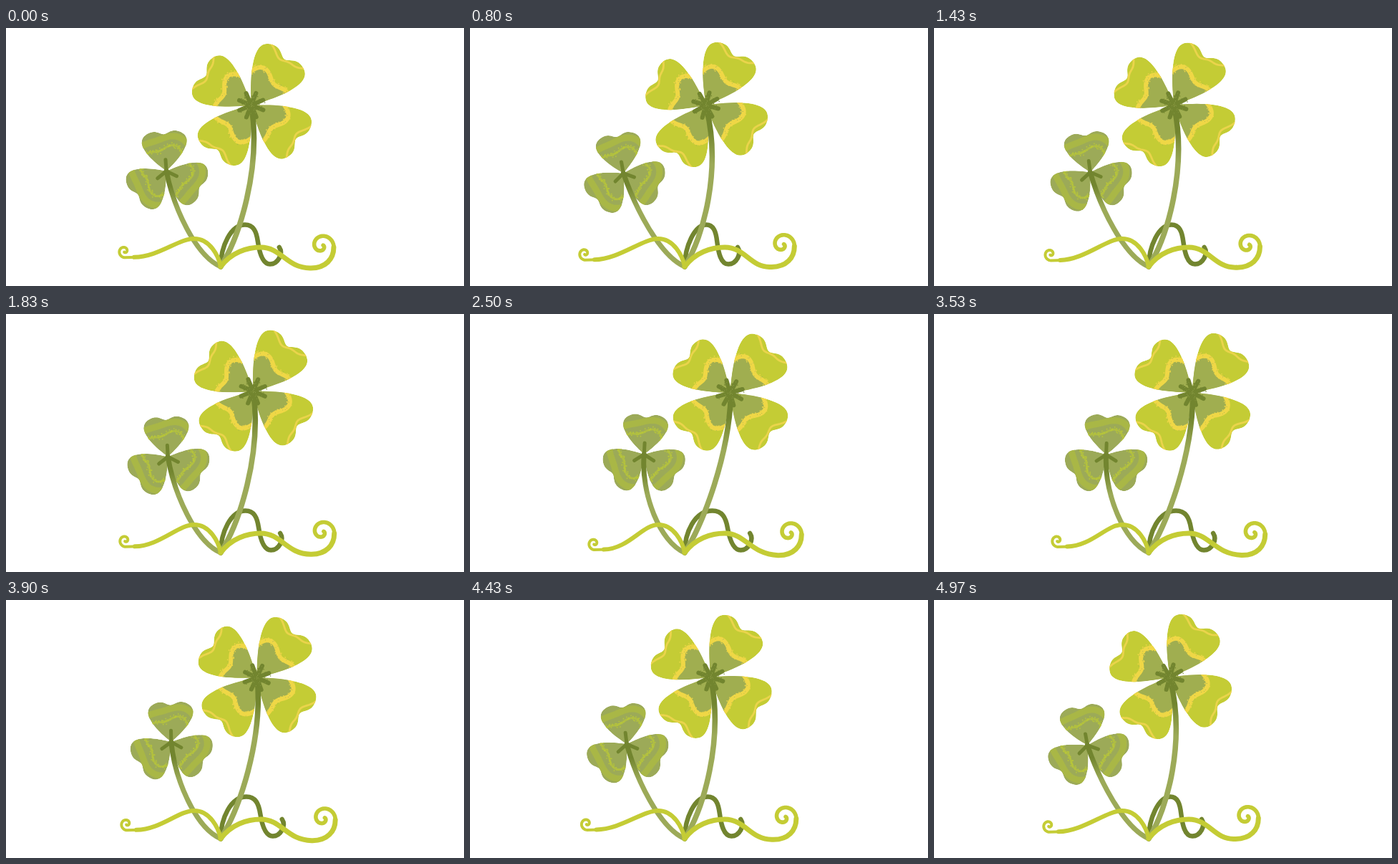
Animation of 640 by 360 pixels, one loop 5100 ms. Source, as an HTML page:

```html
<!DOCTYPE html>
<html lang="en">
<head>
<meta charset="utf-8">
<title>Swaying clover</title>
<style>
  html, body { margin: 0; width: 100%; height: 100%; overflow: hidden; background: #fff; }
  svg { display: block; width: 100%; height: 100%; }
</style>
</head>
<body>
<svg id="stage" viewBox="0 0 640 360" fill="none" stroke-linecap="round" stroke-linejoin="round">
  <defs>
    <linearGradient id="tallFade" gradientUnits="userSpaceOnUse" x1="0" y1="145" x2="0" y2="190">
      <stop offset="0" stop-color="#72852f"/><stop offset="1" stop-color="#9caa58"/>
    </linearGradient>
    <linearGradient id="shortFade" gradientUnits="userSpaceOnUse" x1="0" y1="220" x2="0" y2="252">
      <stop offset="0" stop-color="#72852f"/><stop offset="1" stop-color="#9caa58"/>
    </linearGradient>
  </defs>
</svg>
<script>
const stage = document.getElementById('stage');
const LIME = '#c4cc35', OLIVE = '#9caa58', DARK = '#72852f', YELLOW = '#efd746';
const LOOP = 5100, SWAY = 4170, LEFTMOST = 870, RAD = Math.PI / 180;

let seed = 7;
const rand = () => (seed = (seed * 16807) % 2147483647) / 2147483647;

function add(parent, tag, attrs) {
  const el = document.createElementNS('http://www.w3.org/2000/svg', tag);
  for (const k in attrs) el.setAttribute(k, attrs[k]);
  return parent.appendChild(el);
}
const line = (parent, d, stroke, width) => add(parent, 'path', { d, stroke, 'stroke-width': width });
const group = () => add(stage, 'g', {});

// Point at distance r, with the angle in degrees clockwise from straight up.
const polar = (r, deg) => [r * Math.sin(deg * RAD), -r * Math.cos(deg * RAD)].map(v => v.toFixed(2));

// Curve through fn(u) for u from -1 to 1.
function curve(fn, n = 40) {
  return 'M' + Array.from({ length: n + 1 }, (_, i) => fn(2 * i / n - 1)).join('L');
}

// Chalky specks scattered along a path.
function specks(parent, path, color, spread, size, step) {
  let d = '';
  for (let s = 0; s < path.getTotalLength(); s += step) {
    const p = path.getPointAtLength(s), angle = rand() * 360, r = spread * Math.sqrt(rand());
    const [dx, dy] = polar(r, angle).map(Number);
    d += `M${(p.x + dx).toFixed(1)} ${(p.y + dy).toFixed(1)}h.01`;
  }
  line(parent, d, color, size);
}

// Heart shape: a fan of the given half angle with a rounded end and a notch.
function heart(len, axis, half) {
  return curve(u => {
    const x = Math.sin(u * Math.PI / 2);
    const r = 1.01 * (1 - Math.abs(x) ** 7) - .12 * Math.exp(-25 * x * x);
    return polar(len * r, axis + half * x);
  }, 80) + 'Z';
}

// Wavy band across a leaf.
const band = (len, axis, half, at, depth, flip) => curve(u =>
  polar(len * (at + depth * Math.cos((flip * u * 42 + 18) * 6.2 * RAD)), axis + half * 1.1 * u));

let clips = 0;
function leaf(parent, d, fill) {
  const id = 'leaf' + clips++;
  add(add(parent, 'clipPath', { id }), 'path', { d });
  const g = add(parent, 'g', { 'clip-path': `url(#${id})` });
  add(g, 'path', { d, fill });
  return g;
}

function petal(parent, len, axis, flip) {
  const half = 39, g = leaf(parent, heart(len, axis, half), LIME);
  const d = band(len, axis, half, .55, .065, flip);
  add(g, 'path', { d: d + 'L0,0Z', fill: '#a0ae50' });
  const wave = line(g, d, YELLOW, 6);
  specks(g, wave, YELLOW, 5, 1.7, 1.2);
  specks(g, wave, OLIVE, 4.5, 1, 5);
  line(g, curve(u => polar(len * (.86 + .17 * u * u + .02 * Math.sin(6 * u)), axis + 20 * u)), '#ead44b', 2.8);
}

function leaflet(parent, len, axis, flip) {
  const half = 51, g = leaf(parent, heart(len, axis, half), OLIVE);
  line(g, band(len, axis, half, .82, .05, flip), '#a9b746', 9);
  const wave = line(g, band(len, axis, half, .58, .07, flip), '#afbd43', 3);
  specks(g, wave, '#b9c836', 4, 1.7, 1.3);
}

const rays = (parent, angles, r, width) =>
  line(parent, angles.map(a => `M0,0L${polar(r, a)}`).join(''), DARK, width);

const hook = line(stage, '', DARK, 6.5);
const big = group(), small = group();
const shortStem = line(stage, '', 'url(#shortFade)', 7);
const tallStem = line(stage, '', 'url(#tallFade)', 7.6);
const leftVine = line(stage, '', LIME, 6);
const leftCurl = line(stage, '', LIME, 4);
const rightVine = line(stage, '', LIME, 7);
const rightCurl = line(stage, '', LIME, 5.6);
const bigHeart = group(), smallHeart = group();

petal(big, 89, 36, 1);
petal(big, 85, -57, -1);
petal(big, 88, -143, 1);
petal(big, 88, 127, 1);
const burst = rays(bigHeart, Array.from({ length: 8 }, (_, i) => 22 + 45 * i), 18, 6);
specks(bigHeart, burst, DARK, 5, 1.5, 1.5);
specks(bigHeart, burst, '#93a24c', 5, 1, 4);

const leafAxes = [-4, -129, 116];
leafAxes.forEach((axis, i) => leaflet(small, 58, axis, i ? 1 : -1));
rays(smallHeart, leafAxes, 16, 5);

// Poses are held: each lasts four ticks of 1/30 s, now and then three.
const poseStart = i => Math.round((4 * i - Math.trunc((i - 1) / 9.5)) * 10 / 3) * 10;
function heldTime(now) {
  let i = 0;
  while (poseStart(i + 1) <= now) i++;
  return poseStart(i);
}

// Curl winding inwards from the given angle, dir 1 being clockwise.
function spiral(cx, cy, r, from, dir) {
  return curve(u => {
    const v = (u + 1) / 2, [x, y] = polar(r * (1 - .86 * v), from + dir * 380 * v).map(Number);
    return [cx + x, cy + y];
  });
}

const place = (els, x, y, turn) => els.forEach(el =>
  el.setAttribute('transform', `translate(${x} ${y}) rotate(${turn})`));
const shape = (el, d) => el.setAttribute('d', d);

function draw(ms) {
  const phase = (heldTime(ms % LOOP) - LEFTMOST) / SWAY * 2 * Math.PI;
  const s = -Math.cos(phase), q = Math.sin(phase);
  const bend = (a, b, c) => a + b * s + c * s * s;

  const turn = bend(1.8, 7.3, -.7);
  const bx = bend(347.6, 19.4, 1.3), by = bend(108, 1.6, 1.2);
  const sx = bend(228.3, 17, 3), sy = bend(198.7, -3.8, .2);
  place([big, bigHeart], bx, by, turn);
  place([small, smallHeart], sx, sy, turn);

  shape(tallStem, `M300,333C327,290 ${357 + 6 * s},197 ${bx + 1},${by + 5}`);
  shape(shortStem, `M300,333C265,318 ${235 + 4.5 * s},250 ${sx},${sy}`);

  const h = bend(2.4, 9.5, -.9);
  shape(hook, `M300,333C300,305 314,274.500 ${334 + .5 * h},274.500C${346 + .7 * h},274.500 ${350 + .8 * h},284 ${352 + .85 * h},298` +
    `C${354 + .9 * h},312 ${358 + h},329.500 ${369 + h},329.500C${380 + h},329.500 ${388 + h},315 ${382 + h},306`);

  const lx = bend(3, 7.5, .5), ly = bend(3, 3, 4) + 2.2 * q;
  shape(leftVine, `M300,333C297,318 285,294 263,294C241,294 ${212 + lx},${319 + ly} ${178 + lx},${319.5 + ly}`);
  shape(leftCurl, `M${182 + lx},${319.5 + ly}L${spiral(164.5 + lx, 311 + ly, 9, 180, 1).slice(1)}`);

  const rx = bend(1.4, 5.5, -.6), ry = bend(.4, 1.8, -.2);
  shape(rightVine, `M300,333C315,313 337,306 356,306C385,306 392,335 ${425 + rx},${335 + ry}` +
    `C${447 + rx},${335.5 + ry} ${458 + rx},${322 + ry} ${458 + rx},${306 + ry}`);
  shape(rightCurl, spiral(441 + rx, 304 + ry, 17, 90, -1));
}

function tick() {
  draw(performance.now());
  requestAnimationFrame(tick);
}
tick();
</script>
</body>
</html>
```
